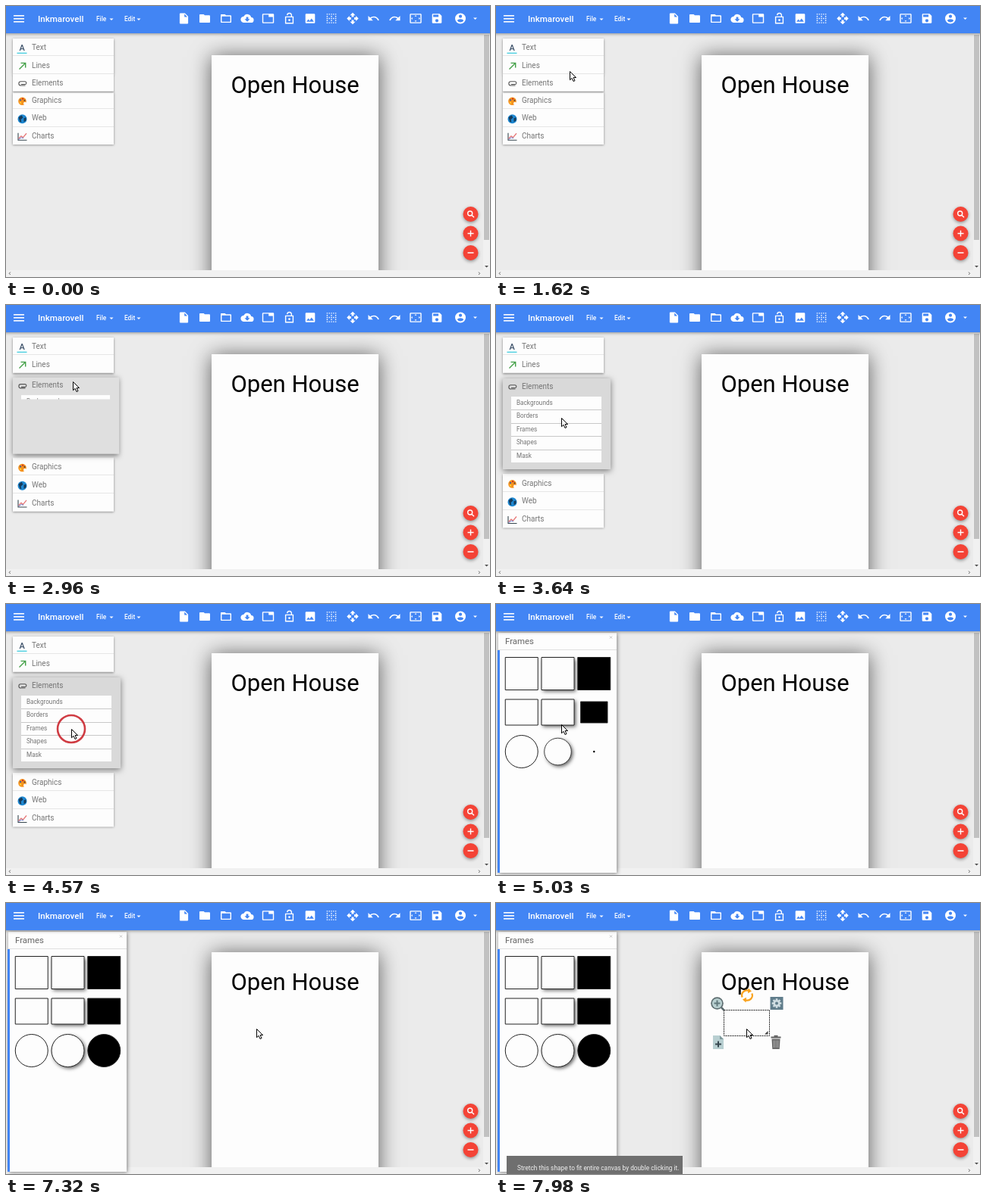
An HTML page with a canvas for the animation above (8 s loop, 638x358 px).

```html
<!DOCTYPE html>
<html lang="en">
<head>
<meta charset="utf-8">
<title>Flyer editor</title>
<style>
html, body { margin: 0; width: 638px; height: 358px; overflow: hidden; background: #ebebeb; }
canvas { display: block; }
</style>
</head>
<body>
<canvas id="stage" width="638" height="358"></canvas>
<script>
const ctx = document.getElementById('stage').getContext('2d');
const LOOP = 8000;

const TICKS = [0, 600, 740, 890, 1040, 1180, 1330, 1470, 1620, 1760, 1920, 2080,
  2500, 2660, 2810, 2960, 3100, 3240, 3380, 3510, 3640, 3780, 3920, 4060,
  4440, 4590, 4740, 4890, 5030, 5190, 5340, 5480, 5630, 5790,
  6200, 6360, 6520, 6680, 6820, 6960, 7100, 7320, 7830, 7980];

// Pointer path: time, x, y.
const POINTER = [[600, 295, 147], [740, 282, 138], [890, 250, 116], [1040, 208, 95], [1180, 165, 80],
  [1330, 128, 73], [1470, 105, 77], [1620, 97, 86], [1760, 95, 90], [1920, 90, 98], [2080, 88, 101],
  [3240, 88, 101], [3380, 88, 120], [3510, 87, 142], [3640, 86, 149], [3920, 86, 161], [4060, 86, 165],
  [4740, 86, 165], [5030, 86, 159], [5340, 87, 147], [5630, 89, 146], [5790, 91, 145],
  [6200, 91, 145], [6360, 103, 151], [6520, 126, 160], [6680, 190, 163], [6820, 256, 164],
  [6960, 308, 166], [7100, 330, 166]];

const clamp = v => Math.max(0, Math.min(1, v));
const span = (t, from, to) => clamp((t - from) / (to - from));
const easeOut = u => 1 - (1 - u) * (1 - u);
const mix = (a, b, u) => a + (b - a) * u;

function pointerAt(t) {
  const i = POINTER.findIndex(p => p[0] > t);
  if (i < 0) return POINTER[POINTER.length - 1].slice(1);
  const a = POINTER[Math.max(0, i - 1)], b = POINTER[i];
  const u = span(t, a[0], b[0]);
  return [mix(a[1], b[1], u), mix(a[2], b[2], u)];
}

function rect(x, y, w, h, color) {
  ctx.fillStyle = color;
  ctx.fillRect(x, y, w, h);
}

function disc(x, y, r, color) {
  ctx.fillStyle = color;
  ctx.beginPath();
  ctx.arc(x, y, r, 0, Math.PI * 2);
  ctx.fill();
}

function text(str, x, y, size, color, weight = 400) {
  ctx.font = `${weight} ${size}px Roboto, sans-serif`;
  ctx.fillStyle = color;
  ctx.fillText(str, x, y);
}

function shaded(blur, dx, dy, alpha, draw) {
  ctx.save();
  ctx.shadowColor = `rgba(0,0,0,${alpha})`;
  ctx.shadowBlur = blur;
  ctx.shadowOffsetX = dx;
  ctx.shadowOffsetY = dy;
  draw();
  ctx.restore();
}

function at(x, y, scale, draw) {
  ctx.save();
  ctx.translate(x, y);
  ctx.scale(scale, scale);
  draw();
  ctx.restore();
}

function fillPath(d, color) {
  ctx.fillStyle = color;
  ctx.fill(new Path2D(d), 'evenodd');
}

function strokePath(d, color, width = 1) {
  ctx.strokeStyle = color;
  ctx.lineWidth = width;
  ctx.stroke(new Path2D(d));
}

// Icons are drawn on a 24-unit grid centred on x, y.
function icon(x, y, d, { flip = 1, turns = 1, scale = 0.7 } = {}) {
  at(x, y, scale, () => {
    ctx.scale(flip, 1);
    for (let i = 0; i < turns; i++) {
      ctx.save();
      ctx.rotate(i * Math.PI / 2);
      ctx.translate(-12, -12);
      fillPath(d, '#fff');
      ctx.restore();
    }
  });
}

const hole = (x, y, r) => `M${x - r} ${y}a${r} ${r} 0 1 0 ${2 * r} 0a${r} ${r} 0 1 0 ${-2 * r} 0`;
const caret = (x, y, color) => at(x, y, 1, () => fillPath('M-2.5-1H2.5L0 1.5Z', color));

function dotGrid() {
  let d = '';
  for (let r = 0; r < 5; r++) for (let c = 0; c < 5; c++) {
    if (r % 2 === 0 || c % 2 === 0) d += `M${3 + 4 * c} ${3 + 4 * r}h2v2h-2Z`;
  }
  return d;
}

function drawToolbar() {
  shaded(4, 0, 1, 0.4, () => rect(-5, -5, 648, 41, '#4285f4'));
  for (const y of [12, 16, 20]) rect(10, y, 14, 1.6, '#fff');
  text('Inkmarovell', 42, 21, 11.6, '#fff', 500);
  text('File', 119, 20, 8.3, '#fff', 500);
  caret(139, 17.5, '#fff');
  text('Edit', 156, 20, 8.3, '#fff', 500);
  caret(175, 17.5, '#fff');
  const y = 16.5, undo = 'M12.5 8C10 8 7.4 9 5.6 10.6L2 7V16H11L7.4 12.4C11 9 18 9.5 20.1 16L22.5 15.2C21 11 17 8 12.5 8Z';
  icon(234.5, y, 'M5 2H14L20 8V21L19 22H5L4 21V3ZM13 3.5V9H18.5Z');
  icon(262, y, 'M3 4H10L12 6H21L22 7V19L21 20H3L2 19V5Z');
  icon(290, y, 'M3 4H10L12 6H21L22 7V19L21 20H3L2 19V5ZM4 8V18H20V8Z');
  icon(318, y, 'M6 20A6 6 0 0 1 5.4 8A7.5 7.5 0 0 1 19.4 10A5 5 0 0 1 19 20ZM17 13H14V9H10V13H7L12 18Z');
  icon(345.5, y, 'M2 3H22L23 4V20L22 21H2L1 20V4ZM3 5V19H21V9H13V5Z');
  icon(373.5, y, 'M4 8H20V22H4ZM6 10V20H18V10Z' + hole(12, 15, 2) + 'M7 6A5 5 0 0 1 17 6V8H15.1V6A3.1 3.1 0 0 0 8.9 6Z');
  icon(401, y, 'M4 3H20L21 4V20L20 21H4L3 20V4ZM5 18H19L14.5 12L11 16.5L8.5 13.5Z');
  icon(429, y, dotGrid());
  icon(457, y, 'M10 9H14V6H17L12 1L7 6H10Z', { turns: 4 });
  icon(484.5, y, undo);
  icon(512.5, y, undo, { flip: -1 });
  icon(540, y, 'M2 3H22L23 4V20L22 21H2L1 20V4ZM3 5V19H21V5ZM12 5.5L10 8H14ZM12 18.5L10 16H14ZM18 10V14L20.5 12ZM6 10V14L3.5 12Z');
  icon(568, y, 'M4 3H17L21 7V20L20 21H4L3 20V4ZM5 5V9H15V5Z' + hole(12, 16, 3));
  icon(599, y, hole(12, 12, 10) + hole(12, 8, 3) + 'M6 16A7.2 7.2 0 0 0 18 16C17 12 7 12 6 16Z');
  caret(618.5, 16.5, '#fff');
}

function drawPage() {
  shaded(26, 0, 2, 0.62, () => rect(271, 65, 220, 320, '#fdfdfd'));
  text('Open House', 296.4, 115, 31, '#000');
}

function drawScrollbars() {
  rect(629, 37, 9, 321, '#f1f1f1');
  rect(630, 38, 7, 271, '#c1c1c1');
  caret(633.5, 344, '#505050');
  rect(0, 349, 638, 9, '#f1f1f1');
  strokePath('M5.8 351.5L4.2 353.3L5.8 355M623 351.5L624.6 353.3L623 355', '#666');
}

function drawZoomButtons() {
  for (const y of [275, 300.5, 326]) shaded(4, 0, 1.5, 0.4, () => disc(612.5, y, 10, '#f44336'));
  at(612.5, 275, 1, () => strokePath('M2.2-1A3 3 0 1 1-3.8-1A3 3 0 1 1 2.2-1M1.4 1.2L4.5 4.3', '#fff', 1.4));
  strokePath('M608.5 300.5H616.5M612.5 296.5V304.5M608.5 326H616.5', '#fff', 1.4);
}

const MENU_ICONS = {
  Text() {
    text('A', -3.9, 4, 11, '#3c5068', 500);
    rect(-7, 6.4, 13, 1.4, '#4dd0e1');
  },
  Lines() { strokePath('M-4 5L4-3M-2-3.2H4.2V3', '#43a047', 1.4); },
  Elements() { strokePath('M4 3.5H-2A2.6 2.6 0 0 1-2-1.7H3.5A1.8 1.8 0 0 1 3.5 2H-1.5', '#555', 1.1); },
  Graphics() {
    disc(0, 1, 5.3, '#f5921e');
    disc(3.5, 4, 2, '#fdfdfd');
    disc(-2.4, -0.5, 1.1, '#3b5ba5');
    disc(0.6, -2.2, 1.1, '#c62828');
    disc(3, 0, 1.1, '#5d4037');
    disc(-2.4, 3, 1.1, '#fdd835');
  },
  Web() {
    disc(0, 1, 6, '#1e88d2');
    fillPath('M-5-1L-1-4L1-1L-2 2L-1 5L-3 5ZM2 0L5-1L5 3L2 5Z', '#163c5c');
  },
  Charts() {
    strokePath('M-5.5-4V5.5H6', '#37474f', 1.1);
    strokePath('M-5 3.5L-1.5 0L1 2L5.5-3.5', '#e57373', 1.2);
    strokePath('M-5 4.5L-1 2L1.5 3', '#5c6bc0', 0.9);
  }
};

function menuRow(name, y, lift = 0) {
  at(21.5, y + 0.5, 1, MENU_ICONS[name]);
  text(name, 34, y + 3.6 + lift, 10, '#757575');
}

function menuCard(names, top, pitch) {
  shaded(3, 0, 1, 0.45, () => rect(9, top, 133, names.length * pitch, '#fdfdfd'));
  names.forEach((name, i) => {
    if (i) rect(9, Math.round(top + i * pitch) - 1, 133, 1, '#e6e6e6');
    menuRow(name, top + (i + 0.5) * pitch);
  });
}

function drawSubList(top, width, height) {
  ctx.save();
  ctx.beginPath();
  ctx.rect(20, top, width, height);
  ctx.clip();
  rect(20, top, width, 87, '#fdfdfd');
  ['Backgrounds', 'Borders', 'Frames', 'Shapes', 'Mask'].forEach((name, i) => {
    const y = top + i * 17.4;
    if (i) rect(20, Math.round(y), width, 1, '#c8c8c8');
    text(name, 27, y + 11, 8.2, '#757575');
  });
  ctx.restore();
}

function drawMenu(t) {
  const open = easeOut(span(t, 2655, 3200));
  menuCard(['Text', 'Lines'], 43, 23.4);
  menuCard(['Graphics', 'Web', 'Charts'], mix(112.5, 223, open), mix(23.5, 23.8, open));
  const top = mix(90, 97, open), bottom = mix(112.5, 217, open), width = mix(133, 142, open);
  const tone = Math.round(mix(253, 217, clamp(open * 1.05)));
  shaded(mix(2, 8, open), 0, mix(1, 2, open), 0.5,
    () => rect(9, top, width, bottom - top, `rgb(${tone},${tone},${tone})`));
  if (!open) rect(9, 89, 133, 1, '#e6e6e6');
  if (!open) rect(9, 112, 133, 1, '#e6e6e6');
  menuRow('Elements', mix(101, 107, open));
  const reveal = span(t, 2930, 3400);
  if (reveal) drawSubList(mix(111, 121, open), mix(110, 119, open), 87 * reveal);
}

function drawFrameShape(row, col, scale) {
  if (!scale) return;
  const h = row === 1 ? 34 : 43;
  at(12 + 47.75 * col + 21.75, [92, 143, 195][row], scale, () => {
    ctx.beginPath();
    if (row === 2) ctx.arc(0, 0, 21.5, 0, Math.PI * 2);
    else ctx.rect(-21.5, -h / 2, 43, h);
    ctx.fillStyle = col === 2 ? '#000' : '#fdfdfd';
    if (col === 1) shaded(5, 2, 2, 0.65, () => ctx.fill());
    else ctx.fill();
    ctx.strokeStyle = '#222';
    ctx.lineWidth = 1;
    ctx.stroke();
  });
}

function drawFramesPanel(t) {
  const slide = easeOut(span(t, 4500, 4860));
  if (!slide) return;
  at(Math.round(-165 * (1 - slide)), 0, 1, () => {
    shaded(5, 1, 1, 0.45, () => rect(3, 38, 156, 317, '#fdfdfd'));
    rect(3, 60, 156, 1, '#e0e0e0');
    rect(2, 61, 3, 294, '#4285f4');
    text('Frames', 12, 52.5, 11.4, '#666');
    strokePath('M150 42.5L153 45.5M153 42.5L150 45.5', '#bbb', 0.9);
    for (let row = 0; row < 3; row++) for (let col = 0; col < 3; col++) {
      const start = 4625 + 100 * (row + col);
      drawFrameShape(row, col, easeOut(span(t, start, start + 180)));
    }
  });
}

function drawPlacedShape() {
  ctx.setLineDash([2, 1]);
  ctx.strokeStyle = '#222';
  ctx.lineWidth = 1;
  ctx.strokeRect(300.5, 141.5, 60, 34);
  ctx.setLineDash([]);
  fillPath('M358.5 169V173.5H354Z', '#444');

  strokePath('M297 138L300.5 141.5', '#5d6d70', 2.5);
  disc(291.5, 132.5, 8.3, '#5d6d70');
  disc(291.5, 132.5, 6.6, '#b9d0d1');
  strokePath('M287.5 132.5H295.5M291.5 128.5V136.5', '#62797d', 2);

  at(331, 122, 1, () => {
    for (const turn of [0, Math.PI]) {
      ctx.save();
      ctx.rotate(turn);
      strokePath('M-6.3 2.5A6.5 6.5 0 0 1 2-6.2', '#f9a11b', 2.2);
      fillPath('M1.5-9.5L6-5.5L1-2.8Z', '#f9a11b');
      ctx.restore();
    }
  });

  rect(361.5, 124, 17, 17, '#607d8b');
  at(370, 132.5, 1, () => {
    for (let i = 0; i < 8; i++) {
      ctx.rotate(Math.PI / 4);
      rect(-1.3, -6.3, 2.6, 4, '#cfdde2');
    }
    disc(0, 0, 4.6, '#cfdde2');
    disc(0, 0, 2, '#607d8b');
  });

  fillPath('M286 175H295L300 180V193H286Z', '#b8cfd1');
  fillPath('M295 175V180H300Z', '#7f999c');
  strokePath('M289 186.5H297M293 182.5V190.5', '#37474f', 2);

  rect(362.5, 176.5, 13, 2, '#5f5f5f');
  rect(366.5, 174.8, 5, 2, '#5f5f5f');
  fillPath('M363.5 179.5H374.5L373.7 193H364.3Z', '#6b6b6b');
  for (const x of [366, 368.6, 371.2]) rect(x, 181.5, 1, 9.5, '#b5b5b5');
}

function drawToast(t) {
  const top = mix(348, 334, span(t, 7830, 7980));
  rect(14, top, 232, 30, '#6f6f6f');
  text('Stretch this shape to fit entire canvas by double clicking it.', 28, top + 19, 8.3, '#f0f0f0');
}

function drawRing(x, y) {
  ctx.strokeStyle = 'rgba(200,28,36,.85)';
  ctx.lineWidth = 2.6;
  ctx.beginPath();
  ctx.arc(x, y, 18, 0, Math.PI * 2);
  ctx.stroke();
}

function drawArrow(x, y) {
  at(x + 0.5, y + 0.5, 1, () => {
    const d = 'M0 0V11.2L2.6 8.8L4.5 13L6.5 12.1L4.6 8H8Z';
    fillPath(d, '#fff');
    strokePath(d, '#000', 1);
  });
}

function drawGrab(x, y) {
  at(x, y, 1, () => {
    const d = 'M-3.5 0.5V-3Q-2.5-4.8-1.2-3.8Q0-5.4 1.2-3.8Q3.8-4.6 4-2V1.5L2.8 5H-2L-4.2 1.8Z';
    fillPath(d, '#fff');
    strokePath(d, '#000', 1.1);
    strokePath('M-1.2-3.5V-1.5M1.3-3.5V-1.5', '#000', 0.8);
  });
}

function drawPointer(t) {
  if (t < 600) return;
  const [x, y] = pointerAt(t);
  const dragging = t >= 6200 && t < 7320;
  const clicking = t === 2500 || t === 4440;
  if (dragging) {
    ctx.strokeStyle = 'rgba(130,130,130,.75)';
    ctx.lineWidth = 1;
    ctx.strokeRect(Math.round(x - 31) + 0.5, Math.round(y - 20) + 0.5, 43, 34);
  }
  if (dragging || clicking) drawRing(x, y);
  if (dragging) drawGrab(x + 16, y + 8.5);
  else drawArrow(Math.round(x), Math.round(y));
}

function render(now) {
  const time = now % LOOP;
  const t = TICKS.filter(tick => tick <= time).pop();
  rect(0, 0, 638, 358, '#ebebeb');
  drawPage();
  if (t >= 7830) drawPlacedShape();
  drawScrollbars();
  drawMenu(t);
  drawFramesPanel(t);
  drawToolbar();
  drawZoomButtons();
  if (t >= 7830) drawToast(t);
  drawPointer(t);
}

const began = performance.now();
function loop() {
  render(performance.now() - began);
  requestAnimationFrame(loop);
}
loop();
</script>
</body>
</html>
```
